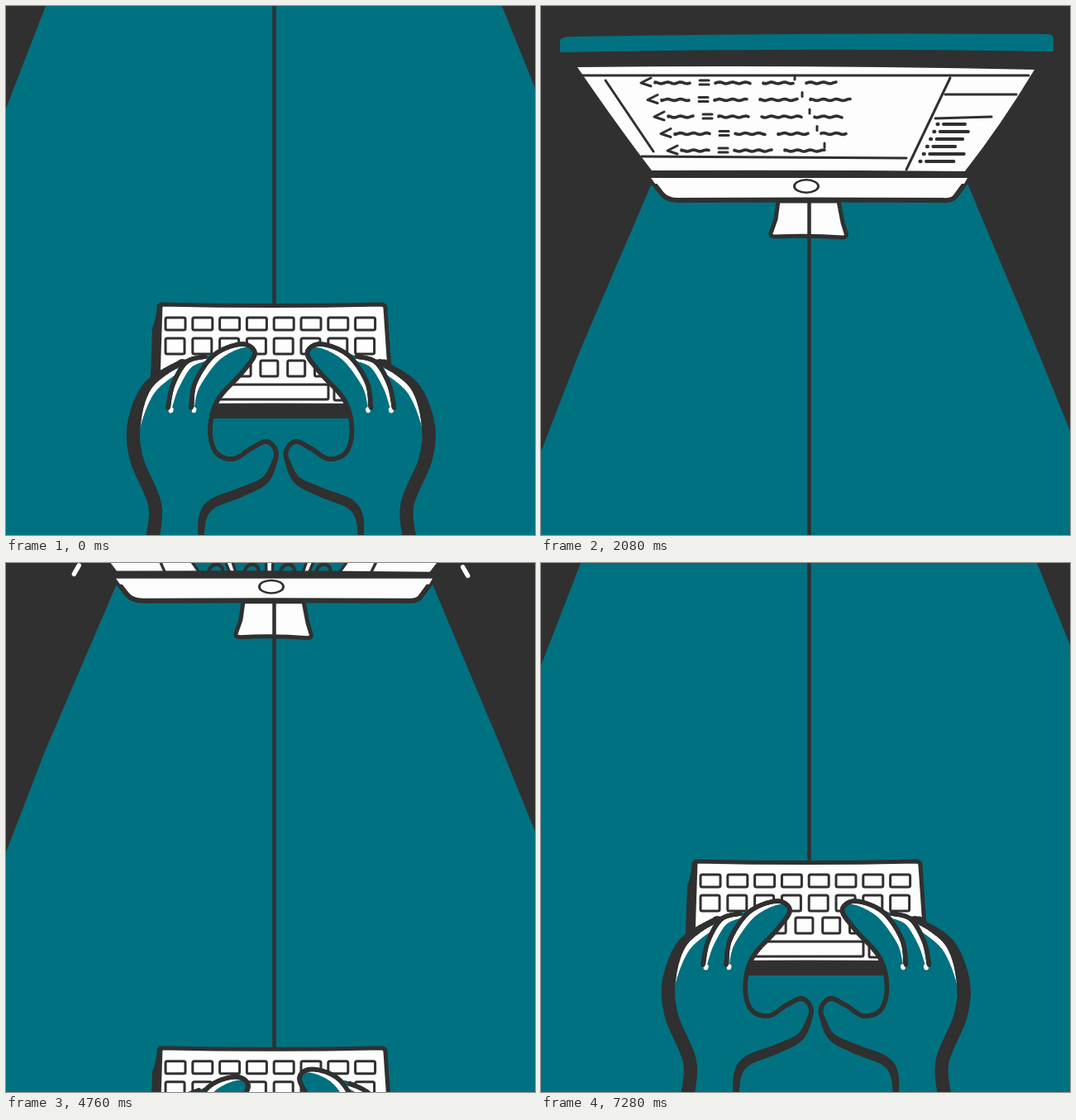
An HTML page with a canvas for the animation above (7.32 s loop, 640 by 640 pixels).

```html
<!DOCTYPE html>
<html lang="en">
<head>
<meta charset="utf-8">
<title>Typing at a desk</title>
<style>
html, body { margin: 0; width: 100%; height: 100%; overflow: hidden; background: #303030; }
canvas { display: block; width: 640px; height: 640px; }
</style>
</head>
<body>
<canvas id="stage" width="640" height="640"></canvas>
<script>
const g = document.getElementById('stage').getContext('2d');
const TEAL = '#007180', DARK = '#303030', WHITE = '#fdfdfd';
const LOOP = 7320, STEP = 40, TRAVEL = 415, TAU = 2 * Math.PI;
g.lineCap = g.lineJoin = 'round';

const clamp = v => Math.max(0, Math.min(1, v));
const ease = v => (1 - Math.cos(Math.PI * clamp(v))) / 2;
const swell = v => Math.sin(Math.PI * v);

function seeded(seed) {
  return () => (seed = seed * 16807 % 2147483647) / 2147483647;
}
function fill(d, color) {
  g.fillStyle = color;
  g.fill(new Path2D(d));
}
function line(d, width = 3, color = DARK) {
  g.strokeStyle = color;
  g.lineWidth = width;
  g.stroke(new Path2D(d));
}
function oval(x, y, rx, ry, color = DARK) {
  g.fillStyle = color;
  g.beginPath();
  g.ellipse(x, y, rx, ry, 0, 0, TAU);
  g.fill();
}
function box(x, y, w, h) {
  g.strokeStyle = DARK;
  g.lineWidth = 3;
  g.beginPath();
  g.roundRect(x, y, w, h, 2);
  g.stroke();
}

// Catmull-Rom curve through a few points
function curve(points) {
  const at = i => points[Math.max(0, Math.min(points.length - 1, i))];
  const out = [];
  for (let i = 0; i < points.length - 1; i++) {
    const [a, b, c, d] = [at(i - 1), at(i), at(i + 1), at(i + 2)];
    for (let u = 0; u < 1; u += 1 / 12) {
      out.push([0, 1].map(k => b[k] + u / 2 * (c[k] - a[k] +
        u * (2 * a[k] - 5 * b[k] + 4 * c[k] - d[k] + u * (3 * (b[k] - c[k]) + d[k] - a[k])))));
    }
  }
  return [...out, at(points.length)];
}
// Brush stroke whose width follows its length
function ribbon(points, width, color = DARK, shift = 0) {
  points.slice(1).forEach(([x, y], i) => {
    const [px, py] = points[i];
    line(`M${px + shift},${py + shift}L${x + shift},${y + shift}`, width(i / points.length), color);
  });
}

// Camera height: slow rise to the monitor, quick drop to the keyboard, twice
function cameraAt(t) {
  const trip = (up, down) => ease((t - up) / 1580) - ease((t - down) / 700);
  return TRAVEL * (trip(250, 2351) + trip(3926, 6570));
}

function drawDesk() {
  fill('M0,124L48,0L136,-205H514L600,0L640,99V700H0Z', TEAL);
}

function drawCode() {
  const rand = seeded(11);
  line('M50,84H590M78,90L136,176M122,182L442,184M495,87L442,198M489,107H575M477,136L545,134');
  for (let i = 0; i < 6; i++) {
    const x = 480 - 4.2 * i, y = 143 + 9 * i;
    oval(x, y, 2.6, 2.2);
    line(`M${x + 7},${y}h${26 + 18 * rand()}`, 4);
  }
  for (let i = 0; i < 5; i++) {
    const y = 93 + 20.5 * i, end = 355 + 30 * rand();
    let x = 121 + 8 * i;
    line(`M${x + 12},${y - 6}L${x},${y}L${x + 12},${y + 4}`);
    for (x += 17; x < end - 15;) {
      const stop = Math.min(end, x + 30 + 28 * rand());
      let d = `M${x},${y}`;
      for (; x < stop; x += 3) d += `L${x},${y + Math.sin(x * .4)}`;
      line(d, 3.6);
      if (x < 210) line(`M${x + 9},${y - 3}h11m-11,5h11`);
      x += x < 210 ? 28 : 13;
    }
    line(`M${307 + 9 * i},${y - 9}v5`);
  }
}

function drawSite() {
  line('M62,95H583M147,97L192,200M493,97L442,200M160,119H480', 3.4);
  oval(172, 107, 10.5, 7.5);
  for (let i = 0; i < 4; i++) line(`M${208 + 53.5 * i},106h36`);
  for (let i = 0; i < 3; i++) oval(434 + 12 * i, 105.5, 2.8, 2.4);

  fill('M160,119H481L455,174H188Z', TEAL);
  for (let i = 0; i < 17; i++) oval(190 + i * 15.5, 168, 10, 7 + 3 * Math.sin(i * 2.1));
  line('M232,160q10,-14 24,-2M400,160q8,-8 16,0M420,160q14,-14 25,4', 2.5);
  oval(297, 159, 6, 10);
  oval(350, 159, 6, 10);
  const head = 'M299,171V146C299,118 349,118 349,146V171Z';
  line(head, 5);
  fill(head, WHITE);
  line('M187,174H455', 3.4);
  for (let i = 0; i < 3; i++) {
    oval(186 + 5.5 * i, 138 + 10 * i, 2.6, 2.6, WHITE);
    line(`M369,${134 + 10.5 * i}h${i ? 28 : 41}`, 3.4, WHITE);
  }
  const lean = x => 318 + (x - 318) * .86;
  for (let i = 0; i < 4; i++) {
    const x = 222 + 50.5 * i, m = lean(x + 21);
    const card = `M${x},184h42L${lean(x + 42)},203H${lean(x)}Z`;
    fill(card, TEAL);
    line(card, 3.4);
    line(`M${m - 9},201Q${m - 6},191 ${m + 1},191Q${m + 9},191 ${m + 9},201`, 4);
  }
}

function drawGlow(t) {
  const pulse = (1 + Math.cos((t - 4760) / 624 * TAU)) / 2;
  for (let i = 0; i < 4; i++) {
    const half = (i ? 2 : 5) + 4 * pulse, dx = half * Math.cos(.35 * i), dy = half * Math.sin(.35 * i);
    const x = 40 + 14 * i + .7 * i * i - 3 * pulse, y = 118 + 25.5 * i + 3 * pulse;
    line(`M${x - dx},${y + dy}L${x + dx},${y - dy}`, 5.5, WHITE);
    line(`M${641 - x + dx},${y + dy + 2}L${641 - x - dx},${y - dy + 2}`, 5.5, WHITE);
  }
  const size = 10 * Math.max(0, Math.cos((t - 6320) / 1040 * TAU));
  let star = `M571,${250 - size}`;
  for (let k = 0; k < 4; k++) {
    const a = k * TAU / 4, b = a + TAU / 8, r = size * .3;
    star += `Q${571 + r * Math.sin(b)},${250 - r * Math.cos(b)} ` +
      `${571 + size * Math.cos(a)},${250 + size * Math.sin(a)}`;
  }
  fill(star, WHITE);
}

function drawMonitor(t) {
  const site = t > 3100;
  fill('M23,42Q24,37 40,37Q320,32 612,34Q620,34 620,40V55Q320,50 23,56Z', TEAL);
  fill('M44,74Q320,71 597,77Q556,145 512,201Q320,199 134,199Q94,147 44,74Z', WHITE);
  if (site) drawSite(); else drawCode();
  fill('M124,199Q320,198 520,200V210H124Z', DARK);

  const stand = 'M287,236L284,258L278,275Q277,279 284,279Q325,277 364,280Q371,280 369,275L365,262L360,236Z';
  fill(stand, WHITE);
  line(stand, 5);
  const chin = 'M132,209L146,227Q152,235 166,235Q320,234 486,235Q496,236 501,231L517,209';
  fill(chin, WHITE);
  line(chin, 6);
  fill('M133,208H516L512,215H138Z', WHITE);
  oval(321, 218, 16, 9);
  oval(321, 218, 13, 6.5, WHITE);
  if (site) drawGlow(t);
}

function drawKeyboard() {
  line('M324.5,-177V360', 4.5);
  fill('M183,361Q182,378 177,390L173,499H468L467,440Z', DARK);
  const body = 'M187,361Q320,364 454,361Q459,361 459,366L467,484Q320,482 183,484Z';
  fill(body, WHITE);
  line(body, 5);
  for (let i = 0; i < 8; i++) {
    const x = 193 + 32.8 * i;
    box(x, 377, 24, 15);
    box(x, 402, 23, 19);
    box(x + 16.5, 429, 21, 19);
  }
  box(225, 458, 165, 18);
  box(397, 459, 58, 18);
}

// Left hand from key points; lift raises the fingers, sway moves them sideways
function drawHand(lift, sway) {
  const bend = ([x, y]) => {
    const across = lift * clamp((x - 165) / 80);
    const thumb = lift * clamp((x - 246) / 50) * clamp((y - 505) / 25);
    return [
      x + sway * across * clamp((600 - y) / 100) - 13 * thumb,
      y - 26 * across * clamp((505 - y) / 85) + 11 * thumb
    ];
  };
  const trace = text => curve(text.split(' ').map(p => bend(p.split(',').map(Number))));
  const arm = trace('177,646 180,603 158,548 155,505 172,459 213,430');
  const middle = trace('196,486 202,458 218,431 241,424');
  const index = trace('224,486 229,455 252,422 285,409 301,420 286,443 256,477 247,512 ' +
    '254,540 275,548 297,535 316,527 327,542 317,570');
  const under = trace('326,548 314,573 285,588 250,602 238,619 236,646');
  const knuckle = index.slice(0, 40);

  fill('M' + [...arm, ...middle.slice(-6), ...index.slice(30), ...under].join('L') + 'Z', TEAL);
  ribbon(arm.slice(-30), u => 9 * swell(u), WHITE, 5);
  ribbon(arm, u => 5 + 11 * clamp(2.4 * (1 - u)));
  ribbon(middle, u => 8 * swell(u), WHITE, 3.5);
  ribbon(middle, () => 5.5);
  ribbon(knuckle, u => 8 * swell(u) ** 2, WHITE, 3.5);
  ribbon(index, () => 5.5);
  ribbon(under, u => 5.5 + 6 * swell(u));
}

function drawHands(t) {
  const tap = t > 2400 ? t - 2400 : t;
  const beat = period => t > 5400 ? 0 : Math.sin(Math.PI * tap / period) ** 2;
  drawHand(beat(160), -16);
  g.save();
  g.translate(665.5, 0);
  g.scale(-1, 1);
  drawHand(beat(320), 11);
  g.restore();
}

function frame(now) {
  const t = Math.floor(now % LOOP / STEP) * STEP;
  g.fillStyle = DARK;
  g.fillRect(0, 0, 640, 640);
  g.save();
  g.translate(0, cameraAt(t));
  drawDesk();
  g.save();
  g.translate(0, -TRAVEL);
  drawMonitor(t);
  g.restore();
  drawKeyboard();
  drawHands(t);
  g.restore();
}

const start = performance.now();
function tick() {
  frame(Math.max(0, performance.now() - start));
  requestAnimationFrame(tick);
}
tick();
</script>
</body>
</html>
```
